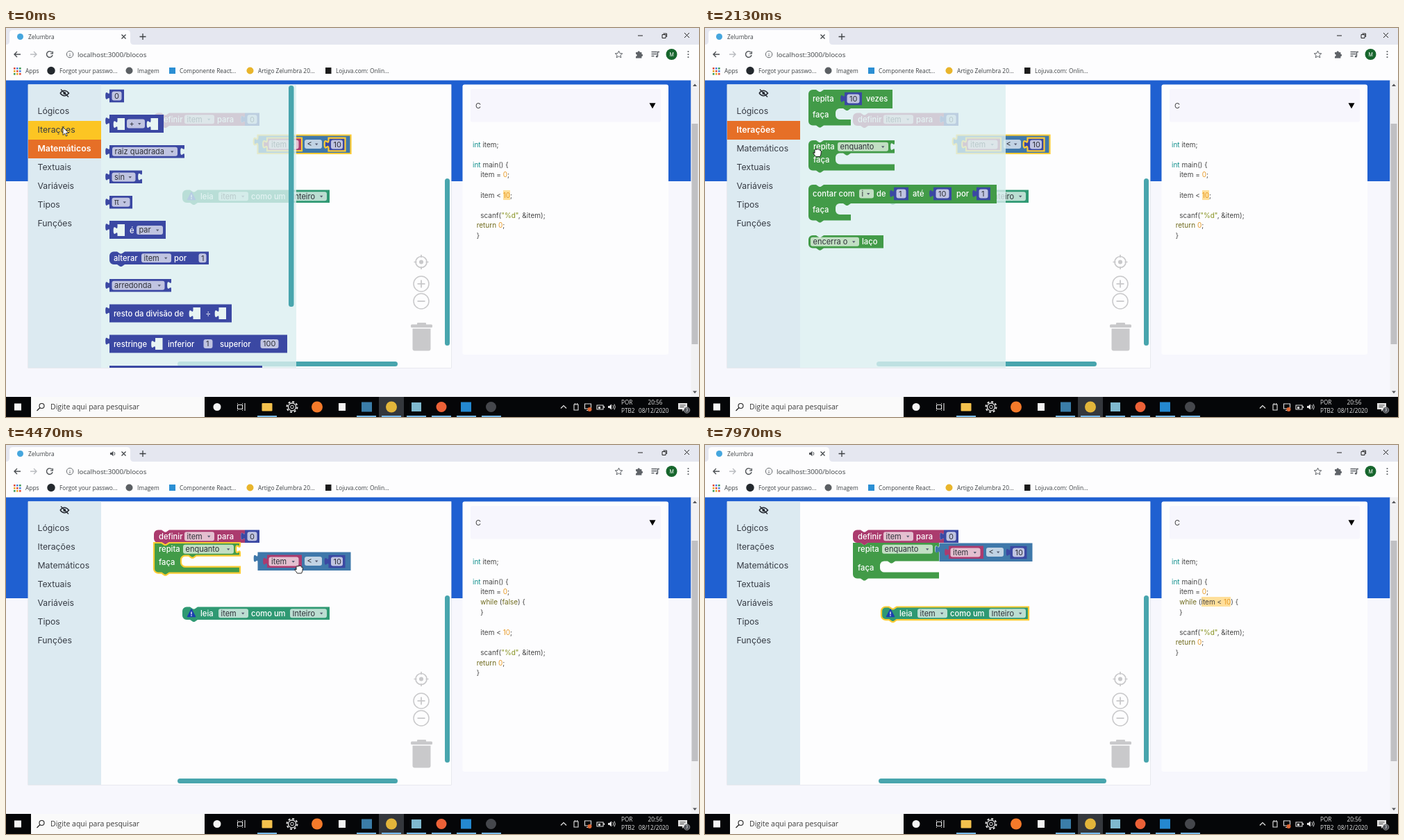
These frames come from a looping animation (998 px wide and 561 px high, 8 s). An HTML page:

```html
<!DOCTYPE html>
<html lang="pt">
<head>
<meta charset="utf-8">
<title>Blocos</title>
<style>
html, body { margin: 0; width: 100%; height: 100%; overflow: hidden; background: #f7f7fd; }
#stage { position: absolute; left: 0; top: 0; width: 998px; height: 561px; overflow: hidden; }
svg { position: absolute; left: 0; top: 0; }
text { font-family: Inter, sans-serif; white-space: pre; }
.ui { font-family: "Open Sans", sans-serif; }
.sel .shape { stroke: #fc3; stroke-width: 2.2; }
#code { position: absolute; left: 672px; top: 160.7px; margin: 0; font: 10px/14.6px Inter, sans-serif; color: #474747; }
#code mark { color: inherit; background: #ffdf9a; padding: 1px 0; }
#code .type { color: #12908d; }
#code .word { color: #6f6a1c; }
#code .text { color: #84901c; }
#code .number { color: #e79a27; }
</style>
</head>
<body>
<div id="stage"><svg id="scene" width="998" height="561" viewBox="0 0 998 561"></svg><pre id="code"></pre></div>
<script>
const MATH = '#3b48a3', LOOP = '#429b48', LOGIC = '#3f78aa', VARS = '#ab3b6e', TEXT = '#2f9973';
const PALE = '#e8f5f3', FLYOUT = '#dcf1f1', TEAL = '#48a5ad', GRAY = '#c9c9cb', INK = '#5f6368';

// Drawing helpers; text is placed by its vertical centre.
const rect = (x, y, w, h, fill, more = '') => `<rect x="${x}" y="${y}" width="${w}" height="${h}" fill="${fill}" ${more}/>`;
const dot = (x, y, r, fill, more = '') => `<circle cx="${x}" cy="${y}" r="${r}" fill="${fill}" ${more}/>`;
const fill = (d, color, more = '') => `<path d="${d}" fill="${color}" ${more}/>`;
const line = (d, color, w = 1.2, more = '') => `<path d="${d}" fill="none" stroke="${color}" stroke-width="${w}" ${more}/>`;
const text = (x, cy, s, size, color, more = '') =>
  `<text x="${x}" y="${cy + size * 0.36}" font-size="${size}" fill="${color}" ${more}>${s}</text>`;
const ui = (x, cy, s, size = 8.4, color = '#3c4043') => text(x, cy, s, size, color, 'class="ui"');
const group = (id, body) => `<g id="${id}">${body}</g>`;

// Block outlines
const NOTCH = 'l4.4 3 2.2 0 4.4 -3', BUMP = 'l-4.4 3 -2.2 0 -4.4 -3';
const SOCKET = 'v3.6c0 7.3 -5.8 -5.8 -5.8 5.5s5.8 -1.8 5.8 5.5';
const TAB = 'c0 -7.3 -5.8 5.8 -5.8 -5.5s5.8 1.8 5.8 -5.5';
const shape = (d, color) => fill(d + 'z', color, 'class="shape"');

function value(x, y, w, h, color, socket) {
  return shape(`M${x} ${y}h${w}${socket ? SOCKET : ''}V${y + h}H${x}V${y + 14.6}${TAB}`, color);
}
function statement(x, y, w, h, color, { socket, mouth, flatTop } = {}) {
  let d = (flatTop ? `M${x} ${y}h11` : `M${x} ${y + 6}a6 6 0 0 1 6 -6h5`) + NOTCH + `H${x + w}` + (socket ? SOCKET : '');
  if (mouth) {
    const left = x + 39;
    d += `V${y + mouth.top}H${left + 22}${BUMP}h-5a6 6 0 0 0 -6 6V${y + mouth.top + 10}a6 6 0 0 0 6 6H${x + mouth.arm}`;
  }
  return shape(d + `V${y + h}H${x + 22}${BUMP}h-5a6 6 0 0 1 -6 -6`, color);
}
const label = (x, cy, s) => text(x, cy, s, 11.2, '#fff', 'font-weight="500"');
const slot = (x, y) => value(x, y, 10.5, 17, PALE);
function field(x, cy, w, s, arrow = true) {
  const tip = x + w - 8;
  return rect(x, cy - 6.5, w, 13, '#fff', 'rx="3" fill-opacity=".68"') + text(x + 3.5, cy, s, 11, '#2e3038') +
    (arrow ? fill(`M${tip - 2} ${cy - 1}h4.4l-2.2 2.8z`, '#555a70') : '');
}
const number = (x, cy, w, s) => value(x, cy - 9.3, w, 18.6, MATH) + field(x + 3.5, cy, w - 7, s, false);
const flyout = w => rect(137, 82, w, 408, FLYOUT, 'opacity=".8"');

const mathFlyout = () => flyout(281) +
  number(149, 98, 21, '0') +
  value(149, 125, 78, 26, MATH) + slot(160.5, 130) + field(174, 138, 26, '+') + slot(208.5, 130) +
  value(149, 169, 108, 18.6, MATH, true) + field(153, 178.3, 94, 'raiz quadrada') +
  value(149, 205.5, 47, 18.6, MATH, true) + field(152.5, 215, 34, 'sin') +
  value(149, 242, 33, 18.6, MATH) + field(152.5, 251.3, 26, 'π') +
  value(149, 278, 81, 26, MATH) + slot(160.5, 283) + label(178, 291.5, 'é') + field(188, 291.5, 38, 'par') +
  statement(149, 322.5, 125, 18.6, MATH) + label(155, 331.7, 'alterar') + field(195, 331.7, 43, 'item') +
  label(242, 331.7, 'por') + number(274, 331.7, 18, '1') +
  value(149, 362, 89, 18.6, MATH, true) + field(152.5, 371.3, 76, 'arredonda') +
  value(149, 398.5, 176, 26, MATH) + label(155, 411.5, 'resto da divisão de') + slot(269.5, 403) +
  label(287.5, 411.5, '÷') + slot(306.5, 403) +
  value(149, 442.5, 256, 26, MATH) + label(155, 455.5, 'restringe') + slot(215, 447) + label(233, 455.5, 'inferior') +
  number(281, 455.5, 20, '1') + label(308, 455.5, 'superior') + number(363, 455.5, 33, '100') +
  rect(149, 487, 220, 3, MATH) + rect(407, 83, 7.5, 319, TEAL, 'rx="3.5"');

function whileBlock(x, y, row = 18.6, flatTop = false) {
  return statement(x, y, 124, row + 25, LOOP, { socket: true, flatTop, mouth: { top: row, arm: 124 } }) +
    label(x + 7, y + 9.3, 'repita') + field(x + 42, y + 9.3, 73, 'enquanto') + label(x + 7, y + row + 9, 'faça');
}
const loopFlyout = () => flyout(296) +
  statement(149, 89, 121, 51.5, LOOP, { mouth: { top: 27, arm: 61 } }) + label(155, 101.7, 'repita') +
  number(201, 102, 25, '10') + label(232, 101.7, 'vezes') + label(155, 124.7, 'faça') +
  whileBlock(149, 162) +
  statement(149, 226, 271, 51.5, LOOP, { mouth: { top: 27, arm: 61 } }) + label(155, 239, 'contar com') +
  field(222, 239, 21, 'i') + label(247, 239, 'de') + number(272, 239, 21, '1') + label(299, 239, 'até') +
  number(329, 239, 26, '10') + label(362, 239, 'por') + number(391, 239, 20, '1') + label(155, 262, 'faça') +
  statement(149, 299, 108, 18.6, LOOP) + field(152, 308.3, 70, 'encerra o') + label(226, 308.3, 'laço');

const setBlock = statement(213, 122.5, 131, 18.6, VARS, { socket: true }) + label(220, 131.8, 'definir') +
  field(257, 131.8, 43, 'item') + label(304, 131.8, 'para') + number(344, 131.8, 21, '0');
const compareBlock = value(362.5, 154.5, 134, 26.5, LOGIC) + value(376, 158.5, 50, 18.6, VARS) +
  field(378.5, 168, 43, 'item') + field(430, 167.5, 25, '&lt;') + number(464.5, 168, 24, '10');
const readBlock = statement(254, 233.5, 212, 18.6, TEXT) +
  fill('M267 237l5.5 10.5h-11z', '#1d3fb0', 'stroke="#1d3fb0" stroke-width="1.5" stroke-linejoin="round"') +
  line('M267 240.5v3.8m0 1v1.4', '#fff', 1.3) + label(280, 242.8, 'leia') + field(306, 242.8, 43, 'item') +
  label(353, 242.8, 'como um') + field(409, 242.8, 53, 'Inteiro');

function browser() {
  const apps = [0, 1, 2, 3, 4, 5, 6, 7, 8].map(i =>
    rect(11 + i % 3 * 4, 57 + (i / 3 | 0) * 4, 2.6, 2.6, ['#e04b3a', '#e9a825', '#3f9b55', '#4a80e0'][i * 3 % 4])).join('');
  return rect(0, 0, 998, 24, '#e5e7f0') + fill('M0 24q5 0 5-5V8q0-5 5-5H174q5 0 5 5v11q0 5 5 5z', '#fdfdfe') +
    rect(0, 24, 998, 51, '#fdfdfe') + dot(20.5, 12.5, 4.5, '#45a6de') + ui(32, 12.5, 'Zelumbra') +
    line('M166.5 9.5l6 6m0-6l-6 6M197 8v9m-4.5-4.5h9', '#3c4043', 1.3) +
    line('M910 11h7M945 9.5h5v5h-5zm1.5-1.5h5v5M977 7l7 7m0-7l-7 7', '#222', 1) +
    line('M21 38h-9m4-4l-4 4 4 4', '#4c5054', 1.4) + line('M35 38h9m-4-4l4 4-4 4', '#b9bcc0', 1.4) +
    line('M66 35a4.3 4.3 0 1 0 1 4m.3-5.3v3.2h-3.2', '#4c5054', 1.4) +
    line('M92 33.3a4.7 4.7 0 1 0 .1 0M92 36v.9m0 1v3', INK, 1) + ui(103, 38.2, 'localhost:3000/blocos', 9.8) +
    fill('M882.5 33l1.5 3.5 3.8.3-2.9 2.4.9 3.6-3.3-2-3.3 2 .9-3.6-2.9-2.4 3.8-.3z', 'none', `stroke="${INK}"`) +
    fill('M907 35h2.5a1.7 1.7 0 0 1 3.4 0h2.5v2.5a1.7 1.7 0 0 1 0 3.4v2.6h-8.4v-2.6a1.6 1.6 0 0 0 0-3.4z', INK) +
    line('M929.5 34.5h8m-8 3h8m-8 3h4M938.5 41v-6.5h2.5', INK, 1.4) + dot(937.3, 41, 1.6, INK) +
    dot(958.5, 38, 8, '#17662d') + text(955.6, 38, 'M', 7, '#fff') +
    [34, 38, 42].map(y => dot(982.5, y, 1.1, INK)).join('') +
    apps + ui(28, 61.5, 'Apps') + dot(65, 61.5, 5.7, '#24292e') + ui(77, 61.5, 'Forgot your passwo...') +
    dot(177.5, 61.5, 5, '#5b5f63') + ui(189, 61.5, 'Imagem') + rect(235, 57, 9, 9, '#2b8fd4') +
    ui(250, 61.5, 'Componente React...') + dot(351.5, 61.5, 5, '#e9b52c') + ui(363, 61.5, 'Artigo Zelumbra 20...') +
    rect(460, 57, 8.5, 9, '#1b1b1b') + ui(475, 61.5, 'Lojuva.com: Onlin...') +
    group('speaker', fill('M150 11h2l2.5-2.3v7.6L152 14h-2z', '#4c5054') + line('M156 10.2q1.6 2.3 0 4.6', '#4c5054', 1));
}

const rows = ['Lógicos', 'Iterações', 'Matemáticos', 'Textuais', 'Variáveis', 'Tipos', 'Funções'];
function page() {
  return rect(0, 75.5, 986.5, 145.5, '#1f60d1') + rect(0, 221, 987, 311, '#f7f7fd') +
    rect(986.5, 75.5, 11.5, 456.5, '#f1f1f3') + rect(987.5, 138, 9, 318, '#c0c0c3') +
    fill('M989 84h6l-3-3.4zM989 523.5h6l-3 3.4z', '#55565a') +
    rect(31.5, 81.5, 610, 409, '#d9dce2') + rect(32, 81.5, 609, 408.5, '#fdfdfe') + rect(32, 81.5, 105, 408.5, '#dceaf1') +
    rect(657.5, 81.5, 296.5, 389.5, '#fdfdfe', 'rx="3"') + rect(669, 88, 274, 47.5, '#f7f6fd', 'rx="2"') +
    text(676, 112.5, 'C', 11, '#444') + fill('M926.5 108.3h9l-4.5 8z', '#000') +
    line('M78 94q6-7.5 12.5 0q-6.5 7.5-12.5 0', '#272b33', 1.6) + dot(84.3, 94, 2, '#272b33') +
    line('M79 88.5l11 11', '#272b33', 1.4) + rect(32, 134, 105, 27, '#fcc523', 'id="hover"') +
    rect(32, 161, 105, 27, '#e66f27', 'id="picked"') +
    rows.map((s, i) => text(45.5, 120 + 27 * i, s, 12.3, '#373c45', `id="row${i}"`)).join('');
}
function tools() {
  return dot(598, 337.5, 8, 'none', `stroke="${GRAY}" stroke-width="1.7"`) + dot(598, 337.5, 3, GRAY) +
    line('M598 327v4m0 13v4M587.5 337.5h4m13 0h4', GRAY, 1.7) +
    [369, 394].map(y => dot(598, y, 11, 'none', `stroke="${GRAY}" stroke-width="1.5"`) + line(`M592.5 ${y}h11`, GRAY, 1.8)).join('') +
    line('M598 363.5v11', GRAY, 1.8) + rect(583, 427.5, 31, 4.5, GRAY, 'rx="1.5"') + rect(592, 425, 13, 4, GRAY, 'rx="1"') +
    fill('M585.5 433.5h26v29q0 3-3 3h-20q-3 0-3-3z', GRAY) +
    rect(632, 217, 7, 241, TEAL, 'rx="3.5"') + rect(247, 481, 317, 7, TEAL, 'rx="3.5" id="hbar"');
}
function taskbar() {
  const w = '#e4e4e4', white = '#f4f4f4';
  const gear = dot(412, 546.5, 5.5, 'none', `stroke="${w}" stroke-width="1.3"`) +
    dot(412, 546.5, 7.5, 'none', `stroke="${w}" stroke-width="2" stroke-dasharray="2.95 2.94"`) +
    dot(412, 546.5, 2.3, 'none', `stroke="${w}"`);
  return rect(0, 532, 998, 29, '#050608') + rect(36, 532, 250, 29, '#fafafa') + rect(537, 532, 36, 29, '#34373c') +
    rect(12, 541.5, 10, 10, white) + dot(51.5, 545, 3.5, 'none', 'stroke="#222" stroke-width="1.1"') +
    line('M49 547.5l-4.5 4.5', '#222', 1.2) + ui(64, 546.5, 'Digite aqui para pesquisar', 10.5, '#3b3b3b') +
    dot(304, 546.5, 5.5, white) + line('M333.5 543.5h7v6h-7zM333.5 541v1m7-1v1m-7 9v1m7-1v1M344 541v11', w, 1.1) +
    rect(368.5, 541, 15, 11.5, '#f3c14d', 'rx="1"') + gear + dot(448, 546.5, 8, '#f47a2a') + rect(479, 541, 10, 11, white) +
    rect(512, 539.5, 15, 14, '#3b7da8') + dot(555, 546.5, 8, '#e2b53a') + rect(584, 540, 14, 13, '#7fb9cf') +
    dot(627, 546.5, 7.5, '#ec6137') + rect(655, 539.5, 15, 14, '#2488d0') + dot(698.5, 546.5, 7.5, '#45474c') +
    [362, 505, 541, 577, 613, 649, 685].map(x => rect(x, 559, 28, 2, '#76b9ed')).join('') +
    line('M799 548.5l4-4 4 4', w) + line('M818 543h6v8h-6zm1.5-2v2m3-2v2', w, 1.1) +
    line('M833.5 542h9v7h-9zM836 551.5h5', w, 1.1) + dot(840.5, 550, 3, '#dc6634') +
    line('M851 544h9v6h-9zM860 546h1.5v2', w, 1.1) + rect(853, 546, 3, 3, w) +
    fill('M867 545h2l3-2.5v8l-3-2.5h-2z', w) + line('M874 544q1.5 2.5 0 5m2-6.5q2.5 4 0 8', w, 1) +
    ui(886, 540.3, 'POR', 8.2, w) + ui(886, 552.5, 'PTB2', 8.2, w) +
    ui(924.5, 540.3, '20:56', 8.2, w) + ui(911, 552.5, '08/12/2020', 8.2, w) +
    fill('M968 541h13v9h-4l-3 3v-3h-6z', w) + line('M970.5 544h8m-8 2.5h6', '#222', .8) +
    dot(980.5, 551, 4.3, '#4b4e54', 'stroke="#ccc" stroke-width=".6"') + text(978.5, 551, '3', 6, '#fff');
}
const arrow = fill('M0 0V11.5L2.7 9 4.5 13 6.2 12.2 4.5 8.4H8.2z', '#fff', 'stroke="#111" stroke-width=".8"');
const hand = fill('M-5-1l2 1v-4q0-1.5 1.3-1.5t1.3 1v-.7q.3-1 1.4-.9t1.2 1.1q.3-.6 1.2-.6t1.2 1v.9q1.9-.6 1.8 1.2 0 4.5-1.8 7.5h-6.2q-1.5-2.5-3.4-4.5z',
  '#fff', 'stroke="#111" stroke-width=".9" stroke-linejoin="round"');

scene.innerHTML = page() + browser() + tools() + group('set', setBlock) + group('read', readBlock) +
  group('loop', whileBlock(0, 0)) + group('loopJoined', whileBlock(213, 141, 18.6, true)) +
  group('loopFull', whileBlock(213, 141, 26.5, true)) + group('compare', compareBlock) +
  group('mathMenu', mathFlyout()) + group('loopMenu', loopFlyout()) + taskbar() +
  group('pointer', group('arrowShape', arrow) + group('handShape', hand));

// Program text; « » encloses highlighted parts.
const head = 'int item;\n\nint main() {\n    item = 0;\n';
const tail = '\n    scanf("%d", &item);\n  return 0;\n  }';
const programs = [
  head + '\n    item < «10»;\n' + tail,
  head + '\n    «while (false) {»\n«    }»\n\n«    »item < 10;\n' + tail,
  head + '    while (false) {\n    }\n\n    item < 10;\n' + tail,
  head + '    while («item < 10») {\n    }\n' + tail
].map(s => s.replace(/&/g, '&amp;').replace(/</g, '&lt;')
  .replace(/("%d")|\b(int)\b|\b(while|false|return)\b|\b(\d+)\b/g, (m, str, type, word) =>
    `<span class="${str ? 'text' : type ? 'type' : word ? 'word' : 'number'}">${m}</span>`)
  .replace(/«/g, '<mark>').replace(/»/g, '</mark>'));

const PICK = 400, PULL = 2600, NEWCODE = 2850, JOIN = 3800, GRAB = 4650, PLUG = 5400, SELECT = 7750;
const track = [ // time, x, y
  [0, 82, 143], [650, 82, 143], [1300, 155, 123], [1500, 155, 123], [2050, 161, 180.5], [2650, 161, 180.5],
  [3230, 201, 172], [3750, 228, 158], [3950, 228, 158], [4400, 421, 180], [4700, 421, 180], [5350, 396, 167],
  [5750, 396, 167], [6400, 416, 210], [6900, 416, 210], [7500, 380, 246], [8000, 380, 246]];

function pointerAt(t) {
  const i = track.findIndex(p => p[0] > t), [t0, x0, y0] = track[i - 1], [t1, x1, y1] = track[i];
  const u = (t - t0) / (t1 - t0), e = u * u * (3 - 2 * u);
  return [x0 + (x1 - x0) * e, y0 + (y1 - y0) * e];
}
const byId = id => document.getElementById(id);
const show = (id, on) => byId(id).setAttribute('visibility', on ? 'visible' : 'hidden');
const select = (id, on) => byId(id).classList.toggle('sel', on);
const move = (id, x, y) => byId(id).setAttribute('transform', `translate(${x} ${y})`);
const set = (id, attrs) => Object.entries(attrs).forEach(([k, v]) => byId(id).setAttribute(k, v));
let shownProgram = -1;

function render(t) {
  const [x, y] = pointerAt(t), within = (a, b) => t >= a && t < b;
  show('mathMenu', t < PICK);
  show('loopMenu', within(PICK, PULL));
  show('hover', t < PICK);
  show('picked', t < PULL);
  set('picked', { y: t < PICK ? 161 : 134 });
  [1, 2].forEach(i => {
    const on = t < PULL && i === (t < PICK ? 2 : 1);
    set('row' + i, { fill: on ? '#fff' : '#373c45', 'font-weight': on ? 600 : 400 });
  });

  show('loop', within(PULL, JOIN));
  move('loop', x - 12, y - 18);
  set('loop', { opacity: .82 });
  show('loopJoined', within(JOIN, PLUG));
  show('loopFull', t >= PLUG);
  select('loop', true);
  select('loopJoined', t < GRAB);

  const dragging = within(4700, PLUG);
  if (dragging) move('compare', x - 421, y - 180);
  else move('compare', t < PLUG ? 0 : -25, t < PLUG ? 0 : -13);
  set('compare', { opacity: dragging ? .82 : 1 });
  select('compare', t < PULL || within(GRAB, SELECT));
  select('read', t >= SELECT);

  const [barX, barW] = within(PULL, JOIN) ? [276, 293] : t < PLUG ? [247, 317] : [250, 328];
  set('hbar', { x: barX, width: barW });
  show('speaker', t >= 3900);

  const program = t < NEWCODE ? 0 : t < JOIN ? 1 : t < PLUG ? 2 : 3;
  if (program !== shownProgram) byId('code').innerHTML = programs[shownProgram = program];

  const grab = within(1150, 3900) || within(4250, 5850) || within(7300, 7900);
  move('pointer', x, y);
  show('handShape', grab);
  show('arrowShape', !grab && t < 7900);
}
function tick() {
  render(performance.now() % 8000);
  requestAnimationFrame(tick);
}
tick();
</script>
</body>
</html>
```
